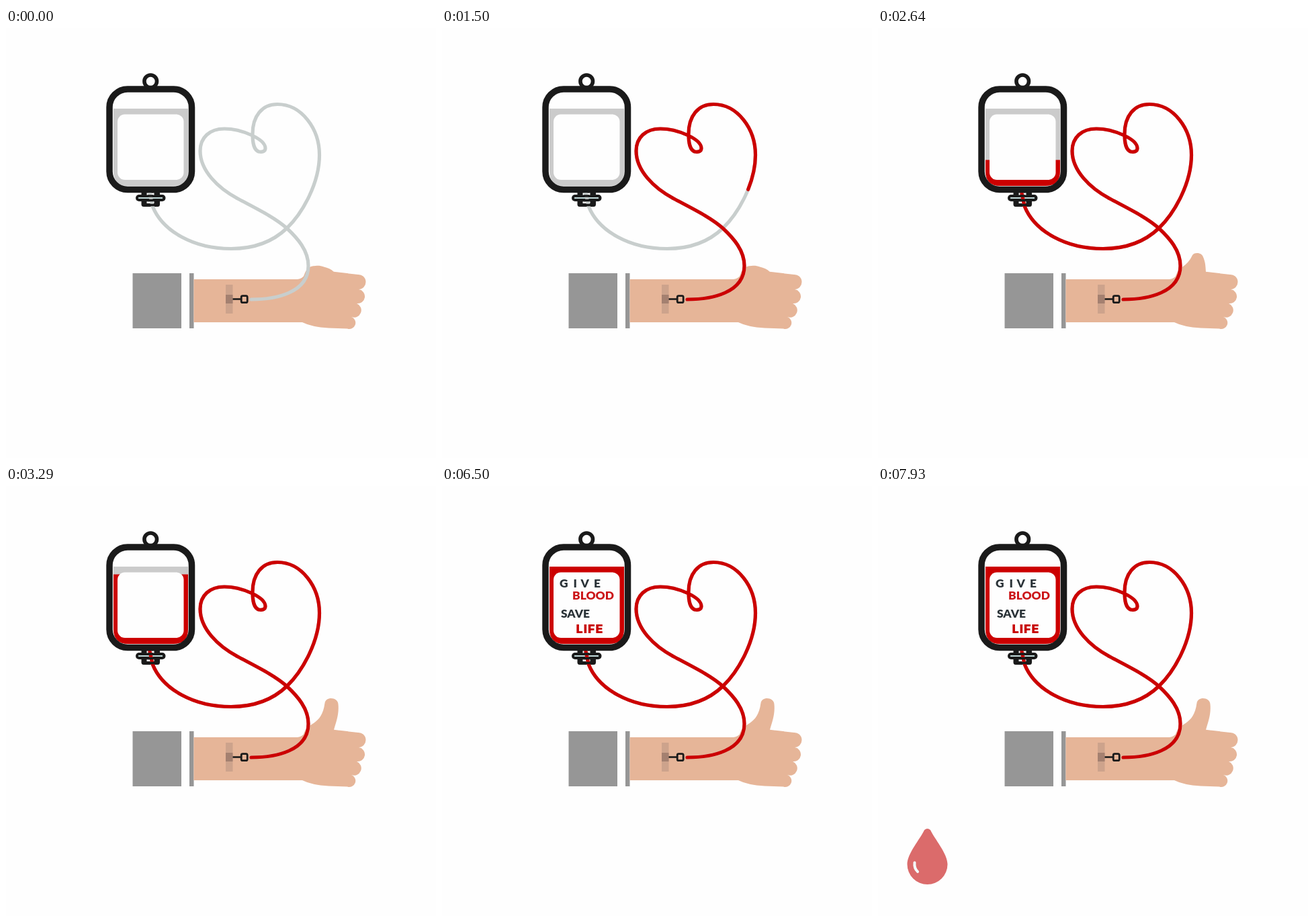
An HTML page for the animation above (8 s loop, 640 px wide and 640 px high).

```html
<!DOCTYPE html>
<html lang="en">
<head>
<meta charset="utf-8">
<title>Give blood</title>
<style>
  html, body { margin: 0; width: 100%; height: 100%; overflow: hidden; background: #fefefe; }
  svg { display: block; width: 100%; height: 100%; }
  text { font: 900 17.4px Lato, "Open Sans", sans-serif; fill: #2b3338; }
  .red { fill: #cb1518; }
  #life { font: 900 18px Inter, "Liberation Sans", sans-serif; fill: #c80000; letter-spacing: 1px; }
</style>
</head>
<body>
<svg viewBox="0 0 640 640">
  <defs>
    <path id="tube" pathLength="1000" d="M365 404 C402 404 450 394 450 354 C450 331 434 313 418 298
      C400 282 375 270 345 254 C315 238 289 212 289 183 C289 163 303 150 325 150
      C350 150 386 165 386 179 C386 184 381 185 376 184 C369 181 367 172 367 158
      C367 131 381 113.5 404 113.5 C440 113.5 466.500 150 466.500 189 C466.500 230 442 275 418 298
      C395 320 365 328.500 335 328.500 C280 328.500 233 303 218 265 L214 246"/>
    <clipPath id="liquid"><path d="M160 120 H271 V213 Q271 235 249 235 H182 Q160 235 160 213 Z"/></clipPath>
  </defs>

  <g fill="#969696">
    <rect x="188.500" y="365" width="72.500" height="82"/>
    <rect x="273" y="365" width="6.500" height="82"/>
  </g>
  <g fill="#e6b598">
    <path d="M279.500 374 H434 Q441 373 444 368 L450 360 L488 362.800 L524 367 A11 11 0 0 1 525 389
      A10.500 10.500 0 0 1 522 410 A10.500 10.500 0 0 1 514 430 A8.700 8.700 0 0 1 508 447.500
      L480 446.500 Q455 445 441 438 H279.500 Z"/>
    <path id="thumb"/>
  </g>
  <rect x="327" y="382" width="10.500" height="43" fill="#cda38c"/>
  <rect x="327" y="397" width="10.500" height="13" fill="#a48070"/>
  <path d="M337.500 403.500 H350" stroke="#1a1a1a" stroke-width="2.600"/>
  <rect x="350.200" y="398.700" width="9" height="10" rx="2" fill="none" stroke="#1a1a1a" stroke-width="2.800"/>

  <g clip-path="url(#liquid)">
    <rect x="160" y="120" width="111" height="116" fill="#cbcbcb"/>
    <rect id="fill" x="160" width="111" height="116" fill="#c00"/>
  </g>
  <rect x="166" y="128.500" width="98.500" height="97.500" rx="11" fill="#fefefe"/>
  <g fill="none" stroke="#1a1a1a">
    <rect x="154" y="91" width="122.500" height="149.500" rx="27" stroke-width="9.500"/>
    <circle cx="215.200" cy="79.300" r="9.300" stroke-width="5.600"/>
  </g>
  <rect x="201.500" y="242" width="27.500" height="24" rx="3.500" fill="#1a1a1a"/>
  <rect x="193" y="248" width="44.500" height="10" rx="5" fill="#1a1a1a"/>
  <path d="M197 253 H233" stroke="#c3dcdc" stroke-width="2"/>
  <path d="M209.500 247 H220.500 M209.500 259.700 H220.500" stroke="#fefefe" stroke-width="2.800"/>

  <g fill="none" stroke-width="5.200" stroke-linecap="round">
    <use href="#tube" stroke="#c8cecd"/>
    <use href="#tube" id="blood" stroke="#c00"/>
  </g>
  <path d="M211 250 H219 M211 256.500 H219 M211 263.500 H221 M211 243.500 H219" stroke="#1a1a1a" stroke-width="3.400"/>

  <text id="give" x="175 195.500 206.500 226" y="150.500">GIVE</text>
  <text id="bloodWord" class="red" x="194" y="169">BLOOD</text>
  <text id="save" x="177" y="195.500">SAVE</text>
  <text id="life" x="199.500" y="219">LIFE</text>

  <g id="drop">
    <path id="dropBody" d="M69 2 Q73.500 -2 78 2 C84 15 103.500 37 103.500 53 A30 30 0 0 1 43.500 53 C43.500 37 63 15 69 2 Z"/>
    <path d="M54.500 50.500 Q53.500 59 59 64" fill="none" stroke="#f4ffff" stroke-width="4" stroke-linecap="round"/>
  </g>
</svg>
<script>
  const LOOP = 8000, FPS = 14;
  const $ = id => document.getElementById(id);
  const lerp = (a, b, p) => a + (b - a) * p;
  const ramp = (t, from, to) => Math.min(1, Math.max(0, (t - from) / (to - from)));
  const mix = (a, b, p) => a.map((v, i) => lerp(v, b[i], p));
  const show = (id, on) => $(id).setAttribute("visibility", on ? "visible" : "hidden");

  const words = { give: 3860, bloodWord: 4710, save: 5570, life: 6500 };
  const folded = [443, 370, 446, 360, 450, 354, 461, 354, 465, 353.5, 469, 354, 473, 355.5, 479, 357, 484, 359, 488, 363];
  const raised = [443, 370, 448, 350, 470, 358, 474.5, 323, 476, 313, 494, 314, 494.5, 325, 496, 340, 491, 352, 488, 363];
  const grey = [207, 225, 225], pink = [219, 107, 107];

  function draw(time) {
    const t = Math.floor((time + 5) * FPS / 1000) * 1000 / FPS;

    const flow = 1000 * ramp(t, 0, 2140);
    $("blood").setAttribute("stroke-dasharray", `${flow} 2000`);
    show("blood", flow > 0);

    $("fill").setAttribute("y", lerp(236, 120, ramp(t, 2250, 3400)));

    const p = mix(folded, raised, ramp(t, 2220, 3070));
    $("thumb").setAttribute("d", `M${p.slice(0, 2)} C${p.slice(2)} L488 385 H443 Z`);

    for (const id in words) show(id, t + 5 >= words[id]);

    show("drop", t >= 7200);
    $("drop").setAttribute("opacity", ramp(t, 7143, 7357));
    $("drop").setAttribute("transform", `translate(0 ${479 + (t - 7357) * 31 / 571})`);
    $("dropBody").setAttribute("fill", `rgb(${mix(grey, pink, ramp(t, 7357, 7928)).map(Math.round)})`);
  }

  const start = performance.now();
  function tick() {
    draw((performance.now() - start) % LOOP);
    requestAnimationFrame(tick);
  }
  tick();
</script>
</body>
</html>
```
